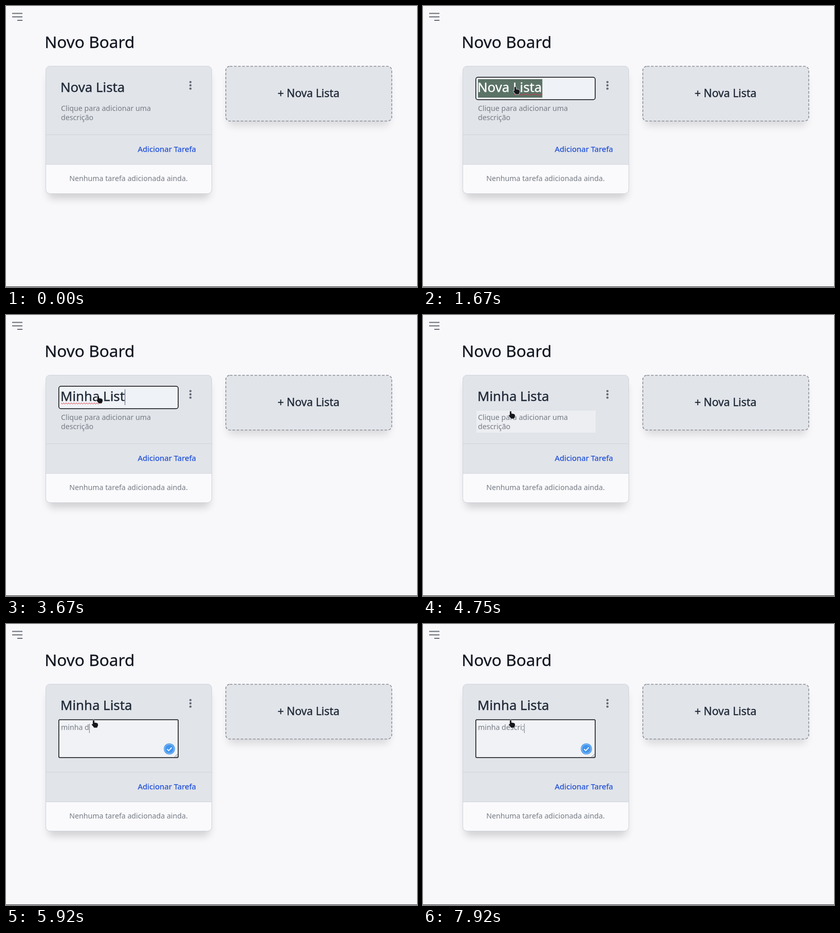
An HTML page for the animation above (8000 ms loop, 800 by 549 pixels).

```html
<!DOCTYPE html>
<html lang="pt-BR">
<head>
<meta charset="utf-8">
<title>Novo Board</title>
<style>
  html, body { margin: 0; width: 100%; height: 100%; overflow: hidden; background: #f8f8fb; }
  svg { display: block; width: 800px; height: 549px; }
  text { font-family: "Noto Sans", "Open Sans", sans-serif; white-space: pre; fill: #1f2937; }
  .medium { stroke: currentColor; stroke-width: .4px; color: #1f2937; }
  .heading { font-size: 31.6px; fill: #10151f; color: #10151f; stroke-width: .3px; }
  .title { font-size: 25.8px; }
  .small { font-size: 14.2px; fill: #767b84; }
  .link { font-size: 14.95px; fill: #1d4ed8; color: #1d4ed8; stroke-width: .25px; }
  .selected text { fill: #fff; color: #fff; }
  .field { stroke: #0c0e12; stroke-width: 1.5px; }
  .line { stroke: #d0d4da; }
</style>
</head>
<body>
<svg viewBox="0 0 800 549">
  <defs>
    <filter id="blur" x="-20%" y="-20%" width="140%" height="150%"><feGaussianBlur stdDeviation="8"/></filter>
    <pattern id="squiggle" width="5" height="4" y="171" patternUnits="userSpaceOnUse">
      <path d="M-.5 3 L2 .8 L4.5 3 L7 .8" fill="none" stroke="#d8323c"/>
    </pattern>
  </defs>
  <rect width="800" height="549" fill="#f8f8fb"/>
  <rect y="548" width="800" height="1" fill="#2c2a31"/>
  <path d="M12 14.5h20M12 21.3h20M22 28h10" stroke="#686c75" stroke-width="2"/>
  <text class="medium heading" x="75.3" y="81.5">Novo Board</text>

  <rect x="432" y="134" width="314" height="100" rx="8" opacity=".12" filter="url(#blur)"/>
  <rect x="427.8" y="117.8" width="323" height="107" rx="8" fill="#e1e4e9"
        stroke="#8d9199" stroke-width="1.6" stroke-dasharray="5 3"/>
  <text class="medium" x="589" y="178" font-size="21.2" text-anchor="middle">+ Nova Lista</text>

  <rect id="shadow" x="82" y="134" width="314" height="242" rx="8" opacity=".16" filter="url(#blur)"/>
  <rect id="card" x="77.5" y="117.5" width="323" height="249" rx="8" fill="#e1e4e9" class="line"/>
  <g fill="#666b75"><circle cx="359" cy="148.6" r="2.2"/><circle cx="359" cy="155" r="2.2"/><circle cx="359" cy="161.4" r="2.2"/></g>
  <g id="footer">
    <path class="line" d="M77 251.5H401"/>
    <text class="medium link" x="370" y="285" text-anchor="end">Adicionar Tarefa</text>
    <path class="line" d="M77.5 309.5H400.5V358.5a8 8 0 0 1-8 8H85.5a8 8 0 0 1-8-8Z" fill="#fafafc"/>
    <text class="small" x="238.5" y="342.3" text-anchor="middle">Nenhuma tarefa adicionada ainda.</text>
  </g>

  <rect id="titleHover" x="104" y="140" width="232" height="43" fill="#eceef2"/>
  <rect id="titleField" class="field" x="102.8" y="139.3" width="232.4" height="43.6" rx="4" fill="#eff2f6"/>
  <g id="title">
    <rect id="titleMark" x="107" y="143" height="36" fill="#5b7267"/>
    <rect id="titleSpell" y="171" height="4" fill="url(#squiggle)"/>
    <text id="titleText" class="title medium" x="106" y="168.3"></text>
    <rect id="titleCaret" y="145" width="1.2" height="31" fill="#60718c"/>
  </g>

  <rect id="noteHover" x="104" y="187" width="232" height="43" fill="#eceef2"/>
  <g id="noteField">
    <rect class="field" x="102.8" y="187" width="232.4" height="74" rx="2" fill="#f0f2f5"/>
    <circle cx="318" cy="244" r="10.8" fill="#4295ed"/>
    <circle cx="318" cy="244" r="9" fill="#4295ed" stroke="#b9d9f8" stroke-width=".9"/>
    <path d="M313.5 244.3l3.2 3.2 6-6.4" fill="none" stroke="#fff" stroke-width="1.8"/>
    <path d="M328 260l6-6M331.5 260l2.5-2.5" stroke="#777c84"/>
  </g>
  <g id="note">
    <g id="noteMark" fill="#5b7267"><rect x="107" y="193" width="176" height="18"/><rect x="107" y="211" width="65" height="18"/></g>
    <text id="noteText" class="small" x="107" y="205.3"></text>
    <text id="noteText2" class="small" x="107" y="223.3">descrição</text>
    <rect id="noteCaret" y="193.5" width="1.1" height="18" fill="#7c828c"/>
  </g>

  <path id="hand" d="M3 1.8Q4.5 0 6 1.8V5.5L11 6.4Q13 6.9 13 9V11.5L11.2 15.5H5.5L1 9.8Q.6 7.6 3 8.8Z"
        fill="#15171b" stroke="#e8eaed" stroke-width="1.4" paint-order="stroke"/>
</svg>
<script>
const DURATION = 8000;
const TITLE_OPEN = 920, TITLE_CLOSE = 4080, NOTE_OPEN = 4900, NOTE_TYPING = 5420;
const el = Object.fromEntries([...document.querySelectorAll("[id]")].map(e => [e.id, e]));

// Each entry is [time, text shown from then on].
const typed = (start, step, prefix, text) =>
  [...text].map((_, i) => [start + i * step, prefix + text.slice(0, i + 1)]);
const titleKeys = [
  [0, "Nova Lista"],
  ...typed(1750, 115, "", "Minhas "),
  [2830, "Minhas"], [2920, "Minha"], [3250, "Minha "],
  ...typed(3415, 83, "Minha ", "Lista"),
];
const noteKeys = [
  [0, "Clique para adicionar uma"],
  ...typed(NOTE_TYPING, 83, "", "minha d"),
  ...typed(6080, 125, "minha d", "escri"), [6830, "minha descri;"],
];
// Pointer stops: [time, x, y].
const pointer = [[250, 300, 250], [700, 175, 157], [4080, 175, 157], [4420, 166, 187]];

const latest = (keys, t) => keys.findLast(k => k[0] <= t)[1];
const show = (e, on) => e.style.display = on ? "" : "none";
const set = (e, values) => { for (const k in values) e.setAttribute(k, values[k]); };

function pointerAt(t) {
  const next = pointer.findIndex(p => p[0] > t);
  if (next < 0) return pointer.at(-1).slice(1);
  const a = pointer[Math.max(0, next - 1)], b = pointer[next];
  const u = Math.max(0, (t - a[0]) / (b[0] - a[0])) || 0, ease = u * u * (3 - 2 * u);
  return [a[1] + (b[1] - a[1]) * ease, a[2] + (b[2] - a[2]) * ease];
}

function placeCaret(caret, text) {
  set(caret, { x: +text.getAttribute("x") + text.getComputedTextLength() });
}

function drawTitle(t) {
  const editing = t >= TITLE_OPEN && t < TITLE_CLOSE;
  const selected = editing && t < titleKeys[1][0];
  const value = latest(titleKeys, t);
  el.titleText.textContent = value;
  show(el.titleHover, t >= 560 && t < TITLE_OPEN);
  show(el.titleField, editing);
  show(el.titleMark, selected);
  show(el.titleCaret, editing && !selected);
  el.title.classList.toggle("selected", selected);
  placeCaret(el.titleCaret, el.titleText);
  set(el.titleMark, { width: el.titleText.getComputedTextLength() });

  const from = selected ? 5 : 0;
  const to = selected ? value.length : value.split(" ")[0].length;
  show(el.titleSpell, editing && (selected || to > 4));
  const start = from ? el.titleText.getSubStringLength(0, from) : 0;
  set(el.titleSpell, { x: 107 + start, width: el.titleText.getSubStringLength(from, to - from) });
}

function drawNote(t) {
  const editing = t >= NOTE_OPEN, typing = t >= NOTE_TYPING;
  const selected = editing && !typing;
  el.noteText.textContent = latest(noteKeys, t);
  show(el.noteHover, t >= 4330 && !editing);
  show(el.noteField, editing);
  show(el.noteText2, !typing);
  show(el.noteMark, selected);
  show(el.noteCaret, typing);
  el.note.classList.toggle("selected", selected);
  set(el.note, { transform: `translate(0 ${editing ? 1.5 : 0})` });
  placeCaret(el.noteCaret, el.noteText);

  const growth = editing ? 38 : 0;
  set(el.card, { height: 249 + growth });
  set(el.shadow, { height: 242 + growth });
  set(el.footer, { transform: `translate(0 ${growth})` });
}

function draw(now) {
  const t = now % DURATION;
  drawTitle(t);
  drawNote(t);
  show(el.hand, t >= pointer[0][0]);
  set(el.hand, { transform: `translate(${pointerAt(t)})` });
  requestAnimationFrame(draw);
}
draw(performance.now());
</script>
</body>
</html>
```
